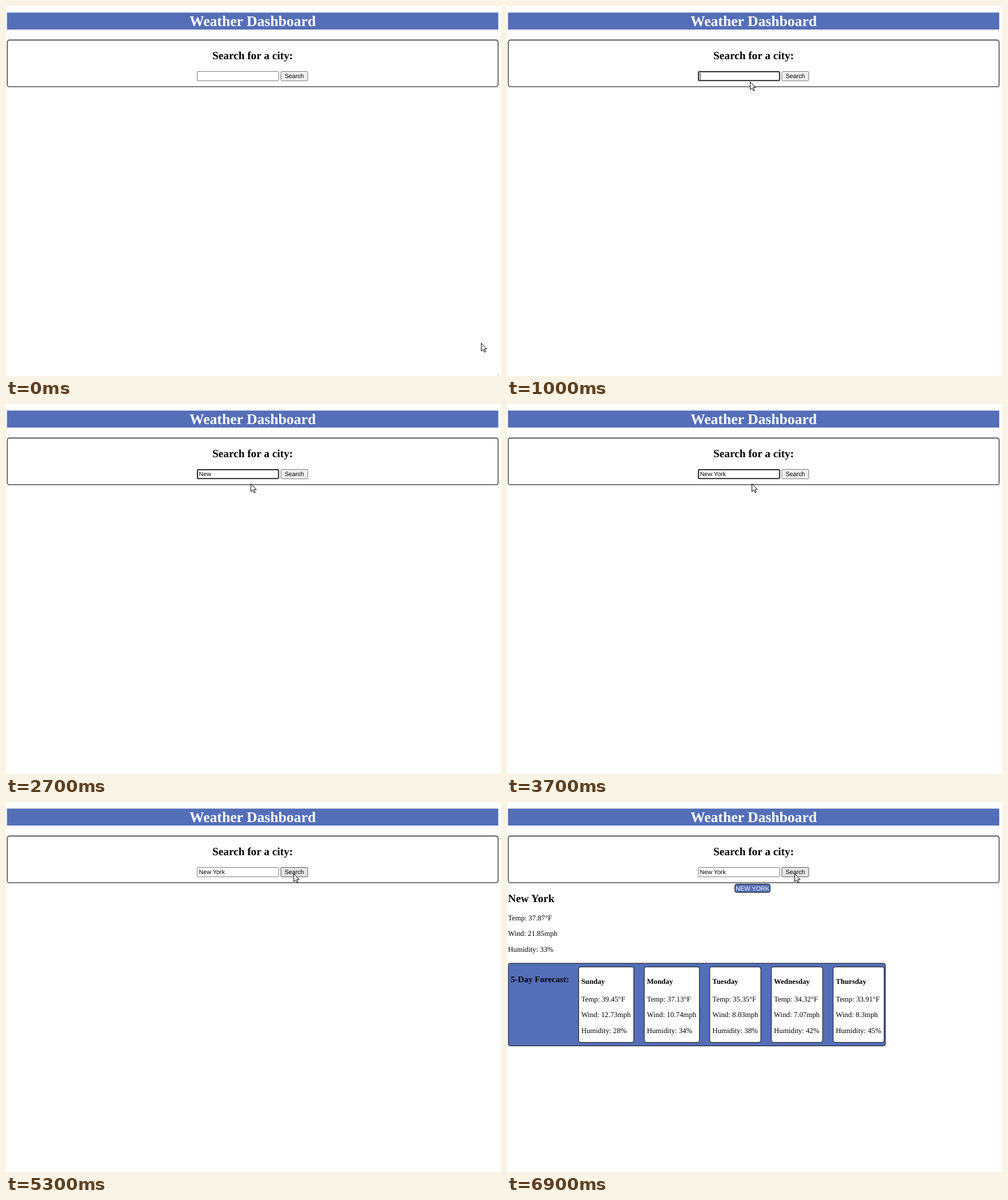
An HTML page for the animation above (7.2 s loop, 866x647 px).

```html
<!DOCTYPE html>
<html lang="en">
<head>
<meta charset="utf-8">
<title>Weather Dashboard</title>
<style>
  html, body { margin: 0; width: 100%; height: 100%; overflow: hidden; background: #fff; }
  svg { display: block; width: 866px; height: 647px; text-rendering: geometricPrecision; }
  text { font: 12.83px "Liberation Serif", "Times New Roman", serif; white-space: pre; }
  .bold { font-weight: bold; }
  .h1 { font-size: 25.67px; fill: #fff; }
  .h2 { font-size: 19.25px; }
  .h3 { font-size: 15.02px; }
  .ui { font: 10.7px "Liberation Sans", Arial, sans-serif; }
  .mid { text-anchor: middle; }
  .blue { fill: #546eb8; }
  .edge { stroke: #111; }
</style>
</head>
<body>
<svg viewBox="0 0 866 647">
  <rect class="blue" x="1.7" y="11.5" width="859.5" height="29.7"/>
  <text class="bold h1 mid" x="431.5" y="35">Weather Dashboard</text>
  <rect x="2.3" y="59.5" width="858.6" height="81.7" rx="3.5" fill="none" stroke="#2b2b2b" stroke-width="1.3"/>
  <text class="bold h2 mid" x="431.5" y="93">Search for a city:</text>

  <rect id="field" rx="1.5" fill="#fff"/>
  <text id="typed" class="ui" x="337.6" y="126.2"></text>
  <rect id="caret" y="117" width="1" height="12"/>
  <rect id="button" x="480.9" y="114.4" width="47" height="16.4" rx="1.8"/>
  <text class="ui mid" x="504.4" y="126.2">Search</text>

  <g id="results">
    <rect class="blue edge" x="398.6" y="143.5" width="61.8" height="14.6" rx="3.2"/>
    <text class="ui mid" x="429.5" y="154.6" fill="#fff" style="font-size:10.85px">NEW YORK</text>
    <rect class="blue edge" x="2.3" y="282" width="659.7" height="144.5" rx="3.5"/>
    <text class="bold h3" x="6.5" y="315">5-Day Forecast:</text>
  </g>

  <path id="mark" d="M861.5 642.5v4" stroke="#aaa"/>
  <path id="arrow" fill="#fff" stroke="#000" stroke-linejoin="round"
    d="M.5 .5V14.4L3.7 11.4 5.9 16.3 8 15.4 5.8 10.7H10Z"/>
  <path id="beam" fill="none" stroke="#000" d="M-3-6.5h2l1 1 1-1h2M0-5.5v11M-3 6.5h2l1-1 1 1h2"/>
</svg>
<script>
const LOOP = 7200, STEP = 100;
const $ = id => document.getElementById(id);
const show = (id, on) => $(id).setAttribute('visibility', on ? 'visible' : 'hidden');

function add(tag, attrs, text = '') {
  const el = document.createElementNS('http://www.w3.org/2000/svg', tag);
  set(el, attrs);
  el.textContent = text;
  $('results').append(el);
}
function set(el, attrs) {
  for (const key in attrs) el.setAttribute(key, attrs[key]);
}

function report(x, title, size, top, firstLine, [temp, wind, humidity]) {
  add('text', { x, y: top, class: 'bold ' + size }, title);
  [`Temp: ${temp}°F`, `Wind: ${wind}mph`, `Humidity: ${humidity}%`].forEach((line, i) =>
    add('text', { x, y: firstLine + i * 27.4 }, line));
}

report(1.8, 'New York', 'h2', 175, 207, [37.87, 21.85, 33]);
[
  [125.4, 96.4, 'Sunday', 39.45, 12.73, 28],
  [240.2, 96.4, 'Monday', 37.13, 10.74, 34],
  [354.8, 89.2, 'Tuesday', 35.35, 8.03, 38],
  [462.5, 89.6, 'Wednesday', 34.32, 7.07, 42],
  [570.7, 89.1, 'Thursday', 33.91, 8.3, 45]
].forEach(([x, width, day, ...data]) => {
  add('rect', { x, y: 288.4, width, height: 131.9, rx: 3.5, fill: '#fff', class: 'edge' });
  report(x + 4.5, day, '', 317.5, 349, data);
});

// Pointer path: [time, x, y]
const path = [
  [0, 831, 589], [100, 815, 562], [300, 690, 420], [600, 500, 255], [800, 437, 208],
  [900, 420, 122], [1000, 425, 132], [1200, 428, 139], [4200, 428, 139], [4400, 485, 155],
  [4550, 555, 158], [4700, 535, 142], [4900, 503, 125], [LOOP, 503, 125]
];
const keys = [1900, 2000, 2100, 2200, 2900, 3000, 3200, 3300];
const blinks = [[900, 1400], [1900, 2700], [2900, 3700], [4200, 4700]];
const within = (t, [from, to]) => t >= from && t < to;

function pointer(t) {
  const i = path.findIndex(p => p[0] > t);
  const [t0, x0, y0] = path[i - 1], [t1, x1, y1] = path[i];
  const k = (t - t0) / (t1 - t0);
  return [x0 + (x1 - x0) * k, y0 + (y1 - y0) * k];
}

function draw(t) {
  const [x, y] = pointer(t);
  const inRow = y > 114 && y < 131;
  const overField = inRow && x > 334 && x < 478;
  const overButton = inRow && x > 481 && x < 528;
  const pressed = within(t, [5000, 5200]);
  const focused = within(t, [900, 5000]);

  for (const id of ['arrow', 'beam']) set($(id), { transform: `translate(${x} ${y})` });
  show('arrow', !overField);
  show('beam', overField);

  set($('field'), focused
    ? { x: 335, y: 114.8, width: 141.8, height: 15.6, stroke: '#101010', 'stroke-width': 1.8 }
    : { x: 334.5, y: 114.4, width: 142.6, height: 16.4, stroke: '#767676', 'stroke-width': 1 });
  set($('button'), {
    fill: pressed ? '#f5f5f5' : overButton ? '#e5e5e5' : '#efefef',
    stroke: pressed ? '#8d8d8d' : overButton ? '#4f4f4f' : '#767676'
  });

  const typed = 'New York'.slice(0, keys.filter(k => k <= t).length);
  $('typed').textContent = typed;
  set($('caret'), { x: 337.6 + (typed ? $('typed').getComputedTextLength() : 0) });
  show('caret', blinks.some(span => within(t, span)));
  show('results', t >= 5600);
  show('mark', t < 100);
}

function tick() {
  const t = performance.now() % LOOP;
  draw(Math.floor(t / STEP) * STEP);
  requestAnimationFrame(tick);
}
tick();
</script>
</body>
</html>
```
